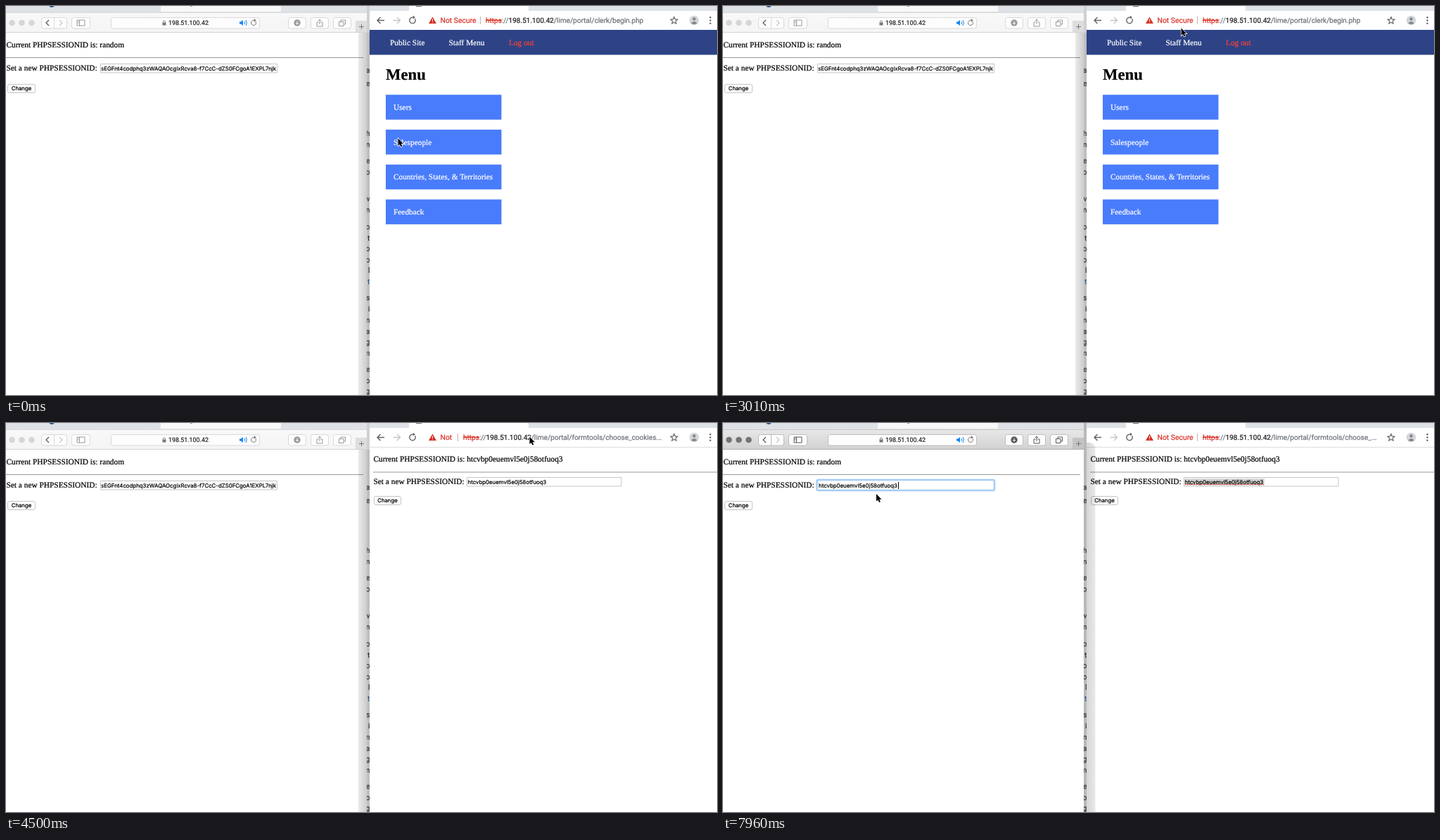
Recreate the animation shown at these times as an HTML page with a canvas. Size 1011 by 554 pixels, loop 8 s.

```html
<!DOCTYPE html>
<html lang="en">
<head>
<meta charset="utf-8">
<title>Session change</title>
<style>
html, body { margin: 0; width: 100%; height: 100%; overflow: hidden; background: #fff; }
canvas { display: block; }
</style>
</head>
<body>
<canvas id="stage" width="1011" height="554"></canvas>
<script>
const g = document.getElementById('stage').getContext('2d');
g.textRendering = 'geometricPrecision';
const LOOP = 8000;
const SERIF = '"Liberation Serif", Times, serif';
const SANS = 'Roboto, sans-serif';
const FIELD = 'Inter, sans-serif';
const HOST = '198.51.100.42';
const TOKEN = 'htcvbp0euemvl5e0j58otfuoq3';
const LONG_TOKEN = '3oRsEGFnt4codphq3zWAQAOcgixRcva8-f7CcC-dZS0FCgoA1EXPL7njk';
const MENU_PATH = '/lime/portal/clerk/begin.php';
const TOOL_PATH = '/lime/portal/formtools/choose_';

// Pointer glides: first step, last step, number of steps, target x, y
const START = [557.5, 188.5];
const MOVES = [
  [150, 620, 4, 724, 57],
  [920, 1370, 4, 330, 22],
  [1520, 1520, 1, 266, 31],
  [1670, 1820, 2, 153, 37],
  [1970, 2120, 2, 276, 80],
  [2410, 3310, 7, 744.5, 19.5],
  [4940, 5240, 3, 709.5, 83],
  [6120, 6560, 4, 360.5, 143],
  [6700, 6910, 2, 260, 84],
  [7060, 7060, 1, 218, 101]
];

function pointerAt(t) {
  let [x, y] = START;
  for (const [from, to, steps, tx, ty] of MOVES) {
    if (t < from) break;
    const k = to > from ? Math.floor((t - from) / (to - from) * (steps - 1) + 1e-6) + 1 : 1;
    const p = Math.min(1, k / steps), e = p * p * (3 - 2 * p);
    x += (tx - x) * e;
    y += (ty - y) * e;
  }
  return [x, y];
}

function rect(x, y, w, h, fill) {
  g.fillStyle = fill;
  g.fillRect(x, y, w, h);
}

function round(x, y, w, h, r, fill, stroke, width = 1) {
  g.beginPath();
  g.roundRect(x, y, w, h, r);
  if (fill) { g.fillStyle = fill; g.fill(); }
  if (stroke) { g.strokeStyle = stroke; g.lineWidth = width; g.stroke(); }
}

function disc(x, y, r, fill) {
  g.beginPath();
  g.arc(x, y, r, 0, 7);
  g.fillStyle = fill;
  g.fill();
}

// A hairline stroke gives the glyphs their slightly heavy weight
function text(str, x, y, size, fill, family = SANS, align = 'left', weight = '') {
  g.font = `${weight} ${size}px ${family}`;
  g.textAlign = align;
  g.fillStyle = g.strokeStyle = fill;
  g.lineWidth = .22;
  g.fillText(str, x, y);
  g.strokeText(str, x, y);
  return g.measureText(str).width;
}

const serif = (str, x, y, fill = '#000') => text(str, x, y, 11.36, fill, SERIF);

function path(d, x, y, stroke, width = 1, fill) {
  const p = new Path2D(d);
  g.save();
  g.translate(x, y);
  if (stroke) { g.strokeStyle = stroke; g.lineWidth = width; g.stroke(p); }
  if (fill) { g.fillStyle = fill; g.fill(p); }
  g.restore();
}

function clipped(x, y, w, h, draw) {
  g.save();
  g.beginPath();
  g.rect(x, y, w, h);
  g.clip();
  draw();
  g.restore();
}

function reload(x, y, r, color, width) {
  g.beginPath();
  g.arc(x, y, r, -0.6, 4.9);
  g.strokeStyle = color;
  g.lineWidth = width;
  g.stroke();
  path('M0 -2.5L0 2L3.2 0Z', x + r * 0.2, y - r, null, 1, color);
}

function button(x, y, w, h) {
  round(x + .5, y + .5, w, h, 2.5, '#fff', '#c4c4c4');
  text('Change', x + w / 2 + .5, y + h / 2 + 3.4, 7.75, '#000', FIELD, 'center');
}

function leftToolbar(active) {
  const ink = active ? '#555' : '#999';
  const edge = active ? '#bdbdbd' : '#d9d9d9';
  rect(0, 0, 513, 10, '#dee1e6');
  rect(220, 0, 171, 8, '#f8f8f8');
  disc(65, -2, 4, '#33558c');
  rect(262, 0, 3, 1, '#999');
  const shade = g.createLinearGradient(0, 9, 0, 37);
  shade.addColorStop(0, active ? '#e8e8e8' : '#f8f8f8');
  shade.addColorStop(1, active ? '#d2d2d2' : '#f5f5f5');
  rect(0, 9, 513, 28, shade);
  rect(0, 9, 513, 1, active ? '#c9c9c9' : '#dadada');
  rect(0, 37, 513, 1, active ? '#b2b2b2' : '#d2d2d2');
  for (const x of [8.5, 22.5, 36.5]) disc(x, 24, 4.3, active ? '#747474' : '#d6d6d6');

  for (const [x, w] of [[50, 37], [93, 27], [149, 212], [401, 26], [433, 26], [465, 26]])
    round(x + .5, 16.5, w - 1, 15.5, 3, '#fdfdfd', edge);
  rect(68, 17, 1, 15, edge);
  path('M3 -4L-1 0L3 4', 58, 24, '#555', 1.2);
  path('M-1 -4L3 0L-1 4', 77, 24, '#aaa');
  path('M-5.5 -4H5.5V4H-5.5ZM-2 -4V4M-4.5 -2H-3M-4.5 0H-3', 106.5, 24, ink);
  path('M-2.5 0H2.5V4H-2.5Z', 225, 23.5, null, 1, '#777');
  path('M-1.6 0V-1.5Q0 -4 1.6 -1.5V0', 225, 23.5, '#777');
  text(HOST, 231, 27.4, 8.9, '#222');
  path('M-5 -1.5H-3L0 -4V4L-3 1.5H-5Z', 337, 24, null, 1, '#1683ef');
  path('M2 -2Q3.5 0 2 2M4 -4Q6.8 0 4 4', 337, 24, '#1683ef');
  reload(352, 24, 3.5, '#777', 1);
  disc(414, 24, 4.7, ink);
  path('M0 -2.6V2M-2 0L0 2.3L2 0', 414, 24, '#fff');
  path('M-1.5 -1H-4V5H4V-1H1.5M0 2V-5M-2 -3L0 -5L2 -3', 446, 24, ink);
  path('M-4.5 -1.5H2V4.5H-4.5ZM-2 -1.5V-4H4.5V2H2', 478, 24, ink);

  rect(497, 21, 16, 16, active ? '#c3c3c3' : '#dedede');
  path('M-3.5 0H3.5M0 -3.5V3.5', 505.5, 29.5, '#777');
}

function leftPage(t, active) {
  rect(0, 38, 513, 516, '#fff');
  serif('Current PHPSESSIONID is: random', .5, 59);
  rect(0, 73, 508, 1, '#999');
  serif('Set a new PHPSESSIONID:', .5, 92);
  if (active) round(133.5, 81, 252.5, 15, 2, '#fff', '#a4cdf5', 2.5);
  else round(134.5, 82.5, 251, 12.5, 0, '#fff', '#c5c5c5');

  const pasted = t >= 7810;
  if (!pasted && t >= 7210) rect(136, 84, t >= 7510 ? 248 : 135, 10, '#b3d7fe');
  clipped(135.5, 83, 249.5, 12, () => {
    if (pasted) text(TOKEN, 136, 91.6, 7.85, '#000', FIELD);
    else text(LONG_TOKEN, 384, 91.6, 7.85, '#000', FIELD, 'right');
  });
  if (active && (pasted || t < 7210)) rect(pasted ? 249 : 384, 84, 1, 10, '#000');
  button(2, 111, 39, 12);
}

// Sliver of the document that shows between the two windows
function gap(active) {
  rect(513, 0, 4, 554, active ? '#b9b9b9' : '#f4f4f4');
  if (!active) {
    const shade = g.createLinearGradient(501, 0, 517, 0);
    shade.addColorStop(0, 'rgba(0,0,0,.08)');
    shade.addColorStop(1, 'rgba(0,0,0,.24)');
    rect(501, 38, 16, 516, shade);
    rect(513, 0, 4, 38, '#d0d0d0');
  }
  const rows = [95, 114, 185, 201, 224, 240, 278, 294, 318, 334, 349, 365, 380, 396,
    419, 435, 451, 467, 482, 498, 521, 537, 552];
  clipped(513, 40, 4, 514, () => rows.forEach((y, i) =>
    text('aehneovnotooltsinagmeog'[i], 517.5, y, 10.5, i === 13 ? '#3c5f8c' : '#333', SANS, 'right')));
}

function address(t) {
  const star = t < 3760 || t >= 4350;
  if (!star) {
    disc(606.5, 20.5, 4.7, '#5f6368');
    path('M-3 -2L0 -1L-1 1L1 3M1 -4L3 -1', 606.5, 20.5, '#fff', 1.1);
    if (t < 3910) {
      clipped(626, 10, 326, 20, () => text(LONG_TOKEN, 949.5, 24, 10.3, '#777c82', SANS, 'right'));
      rect(950, 14, 1, 13, '#333');
    } else {
      const w = text(HOST, 626, 24, 10, '#202124');
      text(TOOL_PATH + 'cookies...', 626 + w, 24, 10, '#777c82');
    }
    return;
  }

  path('M0 -5L1.4 -1.6L5 -1.3L2.2 1L3.1 4.6L0 2.7L-3.1 4.6L-2.2 1L-5 -1.3L-1.4 -1.6Z', 950, 20.5, '#5f6368', 1.1);
  path('M0 -5L5.5 4.5H-5.5Z', 606.5, 20.5, null, 1, '#d93025');
  rect(606, 18.5, 1, 3, '#fff');
  rect(606, 22.5, 1, 1, '#fff');
  const opening = t >= 4350 && t < 4650;
  const [label, bar, start] = !opening ? ['Not Secure', 674, 682]
    : t < 4500 ? ['', 618, 626] : ['Not', 642, 650];
  text(label, 617.5, 24, 10.4, '#d93025');
  rect(bar, 15, 1, 11, '#d5a9a5');
  const tail = t < 4350 ? MENU_PATH : TOOL_PATH + (opening ? 'cookies...' : '...');
  if (t >= 3310 && t < 3760) rect(start - 1, 13, 226, 14, '#b4d5fe');
  let x = start;
  const scheme = text('https', x, 24, 10.05, '#d93025');
  rect(x, 20, scheme, 1, '#d93025');
  x += scheme;
  x += text('://', x, 24, 10.05, '#777c82');
  x += text(HOST, x, 24, 10.05, '#202124');
  text(tail, x, 24, 10.05, '#6c7177');
}

function rightToolbar(t) {
  rect(517, 0, 494, 34, '#fff');
  rect(517, 0, 494, 7, '#dee1e6');
  rect(573, 0, 170, 8, '#fff');
  rect(583, 0, 8, 1, '#777');
  path('M5 0H-5M-.5 -4.5L-5 0L-.5 4.5', 533, 20.5, '#5f6368', 1.4);
  path('M-5 0H5M.5 -4.5L5 0L.5 4.5', 555.5, 20.5, '#c3c5c8', 1.4);
  reload(578, 20.5, 4.2, '#5f6368', 1.4);
  address(t);
  disc(978.5, 20.5, 6.8, '#d4d6d9');
  disc(978.5, 18.5, 2.2, '#83878c');
  path('M-4.2 4Q0 -1 4.2 4Q0 7 -4.2 4Z', 978.5, 20.5, null, 1, '#83878c');
  for (const y of [16.2, 20.5, 24.8]) disc(1001.5, y, 1.2, '#5f6368');
}

function menuPage() {
  rect(517, 34, 494, 35.5, '#2e4386');
  serif('Public Site', 546, 56, '#fff');
  serif('Staff Menu', 629.5, 56, '#fff');
  serif('Log out', 715, 56, '#f9423a');
  text('Menu', 540, 105, 22.72, '#000', SERIF, 'left', 'bold');
  ['Users', 'Salespeople', 'Countries, States, & Territories', 'Feedback'].forEach((item, i) => {
    const y = 126.4 + i * 49.7;
    rect(540, y, 164.5, 35.4, '#497cfb');
    serif(item, 551, y + 21.4, '#fff');
  });
}

function squiggle() {
  g.beginPath();
  for (let x = 657; x < 770; x += 2) g.lineTo(x, 87.6 + (x % 4 === 1 ? .5 : -.5));
  g.strokeStyle = '#e0544c';
  g.lineWidth = .9;
  g.stroke();
}

function toolPage(t, active) {
  rect(517, 34, 494, 1, '#dcdcdc');
  serif('Current PHPSESSIONID is: ' + TOKEN, 522.5, 55.3);
  rect(522, 69.5, 489, 1, '#999');
  serif('Set a new PHPSESSIONID:', 522.5, 87.3);
  const focus = t >= 5520 && !active;
  button(523, 104, 38, 12);
  if (focus) round(654.5, 77, 220.5, 13, 1, '#fff', '#a0a0a0', 2);
  else round(655.5, 77.5, 219.5, 12.5, 0, '#fff', '#c5c5c5');
  if (t >= 5670) rect(656.5, 79, 113.5, 9.5, active ? '#d6d6d6' : '#b8c4d0');
  text(TOKEN, 656.5, 86.6, 7.85, '#000', FIELD);
  if ((t >= 5670 && !active) || t >= 7060) squiggle();
  if (focus) {
    g.save();
    g.shadowColor = 'rgba(0,0,0,.3)';
    g.shadowBlur = 2;
    g.shadowOffsetY = 1;
    round(654, 92, 221.5, 36, 2, '#fff');
    g.restore();
    round(654, 92, 221.5, 36, 2, null, '#d2d2d2', .7);
    text(TOKEN, 662.5, 113, 9.1, '#222', FIELD);
  }
}

function windowShadow() {
  const shade = g.createLinearGradient(517, 0, 530, 0);
  shade.addColorStop(0, 'rgba(0,0,0,.16)');
  shade.addColorStop(.9, 'rgba(0,0,0,.09)');
  shade.addColorStop(1, 'rgba(0,0,0,0)');
  round(517, 28, 13, 530, [0, 9, 0, 0], shade);
}

function pointer(t) {
  if (t >= 7060 && t < 7960) return;
  const [x, y] = pointerAt(t);
  if (t >= 5240 && t < 6120)
    path('M-2 -5.5Q0 -5.5 0 -4Q0 -5.5 2 -5.5M0 -4.5V4.5M-2 5.5Q0 5.5 0 4Q0 5.5 2 5.5', x, y, '#000', 1.1);
  else
    path('M0 0V10.6L2.4 8.4L4 12L5.9 11.2L4.3 7.7H7.5Z', x, y, '#fff', 1.4, '#000');
}

function draw(t) {
  const active = t >= 6420;
  rect(0, 0, 1011, 554, '#fff');
  leftPage(t, active);
  leftToolbar(active);
  gap(active);
  rightToolbar(t);
  if (t < 4350) menuPage();
  else toolPage(t, active);
  if (active) windowShadow();
  pointer(t);
}

function tick() {
  draw(performance.now() % LOOP);
  requestAnimationFrame(tick);
}
tick();
</script>
</body>
</html>
```
